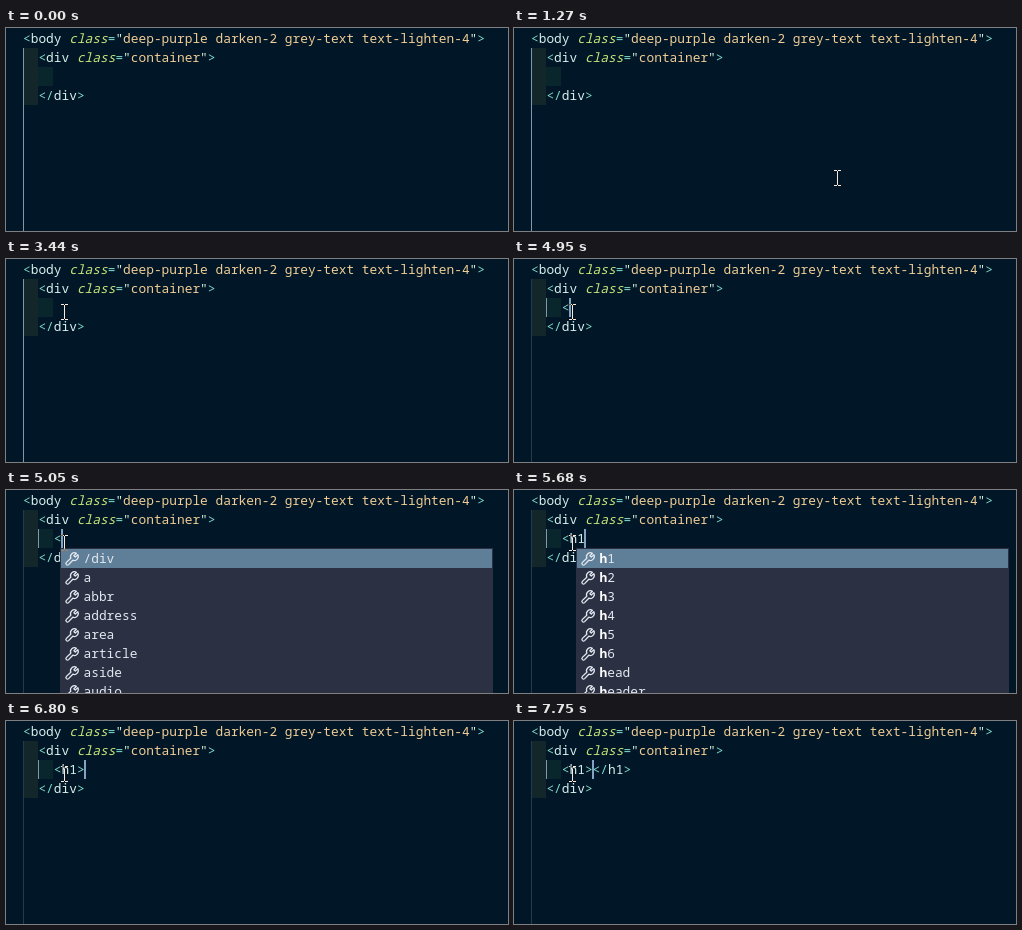
Write an HTML page with a canvas that moves like this. It is 502 px wide and 203 px high and loops after 8000 ms.

```html
<!DOCTYPE html>
<html lang="en">
<head>
<meta charset="utf-8">
<title>Typing a heading tag</title>
<style>
  html, body { margin: 0; width: 100%; height: 100%; overflow: hidden; background: #011627; }
  canvas { display: block; }
</style>
</head>
<body>
<canvas id="stage" width="502" height="203"></canvas>
<script>
const ctx = document.getElementById('stage').getContext('2d');
const W = 502, H = 203, LOOP = 8000;
const LEFT = 17, CHAR = 7.7, ROW = 19;
const FONT = '12.83px "Noto Sans Mono", "DejaVu Sans Mono", monospace';
const C = {
  bg: '#011627', punct: '#7fdbca', tag: '#d6f0ec', attr: '#c5e478', quote: '#d9f5dd',
  string: '#f0cd96', caret: '#80a4c2', guide: '#7e97ac', dimGuide: '#233b4e',
  indent1: '#132629', indent2: '#0a262d',
  list: '#2c3043', selected: '#5f7e97', item: '#e2e8f0', match: '#ffffff'
};
const WRENCH = new Path2D('M12.4 2.2L9.9 4.7L11.3 6.1L13.8 3.6A4 4 0 0 1 8.8 9.2' +
  'L4.6 13.6A1.5 1.5 0 0 1 2.4 11.4L6.8 7.2A4 4 0 0 1 12.4 2.2Z');

const ALL_TAGS = ['/div', 'a', 'abbr', 'address', 'area', 'article', 'aside', 'audio'];
const H_TAGS = ['h1', 'h2', 'h3', 'h4', 'h5', 'h6', 'head', 'header'];

// What the edited line holds: start time, text, caret column
const EDITS = [
  [0, '', 4], [4950, '<', 5], [5110, '<h', 6], [5680, '<h1', 7],
  [6730, '<h1>', 8], [6930, '<h1></h1>', 8]
];
// Suggestion list: start time, left edge, items, matched letters
const POPUPS = [
  [0, 0, [], 0], [5050, 54, ALL_TAGS, 0], [5180, 62, H_TAGS, 1],
  [5750, 71, ['h1'], 2], [6730, 0, [], 0]
];
// Times at which the caret toggles, beginning hidden
const BLINKS = [2910, 3440, 3920, 4420, 4950, 6250, 6730, 7290, 7750];
// Pointer moves: start, end, target x, target y
const MOVES = [
  [1060, 1060, 423, 187], [1060, 1680, 49, 44], [2150, 2180, 50, 45],
  [2185, 2210, 52, 46], [2390, 2530, 58, 52], [2880, 2950, 63, 54], [2950, 3010, 58, 52]
];

const at = (list, t) => list.filter(e => e[0] <= t).pop();
const rowTop = r => 1 + r * ROW;
const colX = c => LEFT + c * CHAR;

function rect(color, x, y, w, h) {
  ctx.fillStyle = color;
  ctx.fillRect(x, y, w, h);
}

// Letters sit on the editor's monospace grid
function write(text, x, base, color, style = '') {
  ctx.font = style + ' ' + FONT;
  ctx.fillStyle = color;
  [...text].forEach((ch, i) => ctx.fillText(ch, x + i * CHAR, base));
}

function codeLine(row, col, parts) {
  for (const [text, color, style] of parts) {
    write(text, colX(col), rowTop(row) + 14, color, style);
    col += text.length;
  }
}

function openTag(name, value) {
  return [['<', C.punct], [name, C.tag], [' ', C.tag], ['class', C.attr, 'italic'],
    ['=', C.punct], ['"', C.quote], [value, C.string], ['"', C.quote], ['>', C.punct]];
}

function markup(text) {
  return (text.match(/[<>\/]+|[^<>\/]+/g) || [])
    .map(s => [s, /[<>]/.test(s) ? C.punct : C.tag]);
}

function drawCode(t) {
  const [, text] = at(EDITS, t);
  rect(C.bg, 0, 0, W, H);
  rect(C.indent1, LEFT, 20, 15, 57);
  rect(C.indent2, 32, 39, 15, 19);
  rect(text ? C.dimGuide : C.guide, LEFT, 20, 1, H - 20);
  if (text) rect(C.guide, 32, 39, 1, ROW);
  codeLine(0, 0, openTag('body', 'deep-purple darken-2 grey-text text-lighten-4'));
  codeLine(1, 2, openTag('div', 'container'));
  codeLine(2, 4, markup(text));
  codeLine(3, 2, markup('</div>'));
}

function drawCaret(t) {
  if (BLINKS.filter(b => b <= t).length === 0) return;
  const offSpans = [[3440, 3920], [4420, 4950], [6250, 6730], [7290, 7750]];
  if (offSpans.some(([a, b]) => t >= a && t < b)) return;
  rect(C.caret, Math.floor(colX(at(EDITS, t)[2])), 39, 2, ROW);
}

function drawIcon(x, y) {
  ctx.save();
  ctx.translate(x, y);
  ctx.strokeStyle = C.item;
  ctx.lineWidth = 1.3;
  ctx.lineJoin = 'round';
  ctx.stroke(WRENCH);
  ctx.restore();
}

function drawPopup(t) {
  const [, x, items, matched] = at(POPUPS, t);
  if (!items.length) return;
  rect(C.list, x, 58, 433, items.length * ROW + 2);
  rect(C.selected, x + 1, 59, 431, ROW);
  items.forEach((name, i) => {
    const y = 59 + i * ROW;
    drawIcon(x + 4, y + 2);
    write(name.slice(0, matched), x + 23.5, y + 14, C.match, 'bold');
    write(name.slice(matched), x + 23.5 + matched * CHAR, y + 14, C.item);
  });
}

function pointerAt(t) {
  let x = 0, y = 0;
  for (const [start, end, tx, ty] of MOVES) {
    if (t < start) break;
    const p = end > start ? Math.min(1, (t - start) / (end - start)) : 1;
    const k = p * p * (3 - 2 * p);
    x += (tx - x) * k;
    y += (ty - y) * k;
  }
  return [Math.round(x), Math.round(y)];
}

// The text pointer inverts whatever lies beneath it
function drawPointer(t) {
  if (t < MOVES[0][0]) return;
  const [x, y] = pointerAt(t);
  ctx.globalCompositeOperation = 'difference';
  for (const edge of [y - 7, y + 8]) {
    rect('#fff', x - 3, edge, 3, 1);
    rect('#fff', x + 1, edge, 3, 1);
  }
  rect('#fff', x, y - 6, 1, 14);
  ctx.globalCompositeOperation = 'source-over';
}

function frame() {
  const t = performance.now() % LOOP;
  drawCode(t);
  drawCaret(t);
  drawPopup(t);
  drawPointer(t);
  requestAnimationFrame(frame);
}
frame();
</script>
</body>
</html>
```
